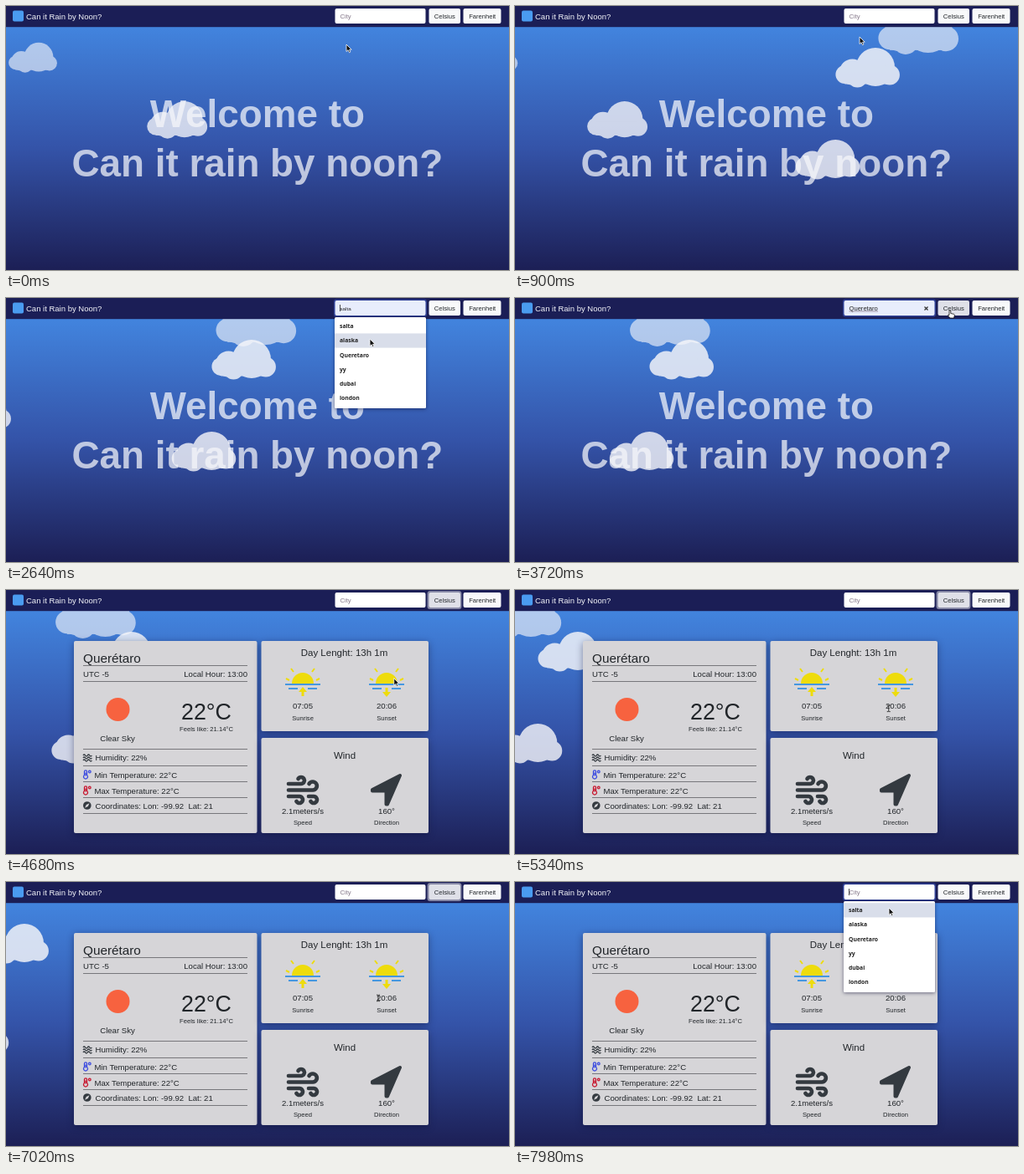
An HTML page that plays this animation: 600 px wide and 316 px high, repeating every 8 s.

```html
<!DOCTYPE html>
<html lang="en">
<head>
<meta charset="utf-8">
<title>Weather</title>
<style>
  html, body { margin: 0; width: 100%; height: 100%; overflow: hidden; background: #1c1f55; }
  svg { display: block; width: 600px; height: 316px; font-family: "Liberation Sans", Arial, sans-serif; }
  text { white-space: pre; }
  .mid { text-anchor: middle; }
  .s { font-size: 7.6px; }
  .m { font-size: 9.6px; }
  .l { font-size: 11.5px; }
  .card { fill: #d6d5d8; filter: drop-shadow(0 2px 4px rgba(10, 14, 50, .45)); }
  .menu { font: 700 6.8px "Noto Sans", "Open Sans", sans-serif; }
</style>
</head>
<body>
<svg viewBox="0 0 600 316">
  <defs>
    <linearGradient id="sky" x1="0" y1="0" x2="0" y2="1">
      <stop offset="0" stop-color="#4284de"/>
      <stop offset=".5" stop-color="#3453a8"/>
      <stop offset="1" stop-color="#1c1f55"/>
    </linearGradient>
    <g id="cloud" fill="#f7f7fa">
      <circle cx="11" cy="32" r="11"/>
      <circle cx="20" cy="29" r="15.5"/>
      <circle cx="47.5" cy="23" r="23"/>
      <circle cx="26" cy="35.5" r="12"/>
      <circle cx="64.500" cy="32.500" r="12"/>
      <rect x="11" y="26" width="53.500" height="17.500"/>
    </g>
    <g id="halfSun" fill="none" stroke-width="2">
      <path d="M-13 21A13 13 0 0 1 13 21Z" fill="#eedc0c"/>
      <path d="M-20 15L-16 17M-14 3L-11 7M14 3L11 7M20 15L16 17" stroke="#eedc0c"/>
      <path d="M-21 22H21M-17 27H-6M6 27H17" stroke="#4597e0"/>
    </g>
    <g id="thermo" fill="none" stroke-width="1.3">
      <path d="M1.5 6V1.8a1.5 1.5 0 0 1 3 0V6a2.5 2.5 0 1 1-3 0ZM3 3V7"/>
      <circle cx="7.8" cy="2" r="1.3"/>
    </g>
  </defs>

  <rect y="25" width="600" height="291" fill="url(#sky)"/>
  <g id="welcome" class="mid" font-size="45.8" font-weight="700" fill="#fff" fill-opacity=".69">
    <text x="299.8" y="145">Welcome to</text>
    <text x="299.8" y="204">Can it rain by noon?</text>
  </g>
  <g id="clouds"></g>

  <g id="cards" fill="#212529">
    <rect class="card" x="81" y="61" width="218.5" height="230" rx="2"/>
    <rect class="card" x="304.5" y="61" width="199.5" height="108" rx="2"/>
    <rect class="card" x="304.5" y="177" width="199.5" height="114" rx="2"/>
    <path d="M92 90.5H288M92 109.5H288M92 190.5H288M92 210.5H288M92 229.5H288M92 248.5H288M92 267.5H288" stroke="#77777b"/>
    <text x="92" y="87" font-size="15.3">Querétaro</text>
    <g class="m">
      <text x="92" y="104">UTC -5</text>
      <text x="288" y="104" text-anchor="end">Local Hour: 13:00</text>
      <text class="mid" x="133" y="180.5">Clear Sky</text>
      <text x="106.5" y="204">Humidity: 22%</text>
      <text x="105.5" y="224.5">Min Temperature: 22°C</text>
      <text x="105.5" y="243.5">Max Temperature: 22°C</text>
      <text x="106.5" y="262">Coordinates: Lon: -99.92  Lat: 21</text>
    </g>
    <circle cx="133.5" cy="143" r="14" fill="#f7623f"/>
    <text class="mid" x="239" y="155" font-size="26.8">22°C</text>
    <text class="mid s" x="239" y="169">Feels like: 21.14°C</text>
    <path d="M92 198q1.3-2 2.6 0t2.6 0t2.6 0t2.6 0M92 201q1.3-2 2.6 0t2.6 0t2.6 0t2.6 0M92 204q1.3-2 2.6 0t2.6 0t2.6 0t2.6 0" fill="none" stroke="#343a40" stroke-width="1.3"/>
    <use href="#thermo" x="92" y="215.5" stroke="#3c4be0"/>
    <use href="#thermo" x="92" y="234.5" stroke="#c8172f"/>
    <circle cx="96.8" cy="258" r="4.8" fill="#343a40"/>
    <path d="M99.5 255.3L97.8 259L94.1 260.7L95.8 257Z" fill="#d6d5d8"/>

    <g class="mid">
      <text class="l" x="403.5" y="79">Day Lenght: 13h 1m</text>
      <text class="l" x="404" y="202">Wind</text>
      <g class="m">
        <text x="354" y="142">07:05</text>
        <text x="454" y="142">20:06</text>
        <text x="354" y="268">2.1meters/s</text>
        <text x="454" y="268">160°</text>
      </g>
      <g class="s">
        <text x="354" y="156">Sunrise</text>
        <text x="454" y="156">Sunset</text>
        <text x="354" y="281">Speed</text>
        <text x="454" y="281">Direction</text>
      </g>
    </g>
    <use href="#halfSun" x="354" y="91"/>
    <use href="#halfSun" x="454" y="91"/>
    <path d="M354 116l5 6h-3.5v5h-3v-5h-3.5ZM454 128l5-6h-3.5v-5h-3v5h-3.5Z" fill="#eedc0c"/>
    <g fill="none" stroke="#343a40" stroke-width="4.6" stroke-linecap="round">
      <path d="M337 232H352a4 4 0 1 0-3.5-6"/>
      <path d="M337 239.5H366a5 5 0 1 0-4.5-7.5"/>
      <path d="M337 247H350a4 4 0 1 1-3.5 6"/>
      <path d="M361 247H367a4 4 0 1 1-3.5 6"/>
    </g>
    <path d="M470 222L455 256.5H453.5V240.5H437V239Z" fill="#343a40" stroke="#343a40" stroke-width="4" stroke-linejoin="round"/>
  </g>

  <rect width="600" height="25.2" fill="#1b1e56"/>
  <rect x="8" y="5.5" width="13" height="13" rx="2" fill="#4a9bf0"/>
  <text x="24" y="15.5" font-size="9.5" fill="#f4f5fa">Can it Rain by Noon?</text>

  <rect id="fieldRing" x="391" y="1.5" width="111" height="21" rx="3" fill="#2f3f94"/>
  <rect id="field" x="392.5" y="3" width="108" height="18" rx="2"/>
  <text id="entry" x="398.5" y="14.5"></text>
  <rect id="caret" x="398" y="8" width=".8" height="8" fill="#222"/>
  <path id="clear" d="M488.5 10.5l4 4m0-4l-4 4" stroke="#333" stroke-width="1.2"/>
  <path id="spell" d="M398.5 16H433" stroke="#8d7f90" stroke-width=".8"/>

  <rect id="buttonRing" x="502.5" y="1" width="41" height="22" rx="3.5" fill="#8587a5"/>
  <rect id="celsius" x="504.5" y="3" width="37.5" height="18" rx="2"/>
  <rect x="545.5" y="3" width="45" height="18" rx="2" fill="#f8f9fa"/>
  <g class="s mid" fill="#212529">
    <text x="523.3" y="14.5">Celsius</text>
    <text x="568.2" y="14.5">Farenheit</text>
  </g>

  <g id="menu" class="menu" fill="#222">
    <rect x="392" y="23" width="109" height="109" rx="1.5" fill="#fff" style="filter:drop-shadow(0 1px 2px rgba(0,0,40,.5))"/>
    <rect id="hover" x="392" width="109" height="17.2" fill="#d9deea"/>
  </g>

  <g id="pointer">
    <path data-kind="arrow" d="M0 0V8.5L2 6.7L3.5 9.7L4.9 9L3.5 6.2H6.2Z" fill="#111" stroke="#fff" stroke-width=".8"/>
    <path data-kind="hand" d="M-1 5V.8a.9.9 0 0 1 1.8 0V3.5L4.5 4.3Q5.500 4.600 5.300 6L4.500 9H0L-2.600 6Q-2.500 4.500-1 5.500Z" fill="#fff" stroke="#111" stroke-width=".8"/>
    <path data-kind="beam" d="M-2-3.5H-.5L0-3L.5-3.5H2M0-3V3.5M-2 4H-.5L0 3.5L.5 4H2" fill="none" stroke="#222" stroke-width=".9"/>
  </g>
</svg>
<script>
const LOOP = 8000;
const $ = id => document.getElementById(id);
const show = (el, on) => el.setAttribute('visibility', on ? 'visible' : 'hidden');
const svgEl = (name, attrs, parent) => {
  const el = document.createElementNS('http://www.w3.org/2000/svg', name);
  for (const key in attrs) el.setAttribute(key, attrs[key]);
  return parent.appendChild(el);
};

// Distance covered by a cloud of unit speed; the page stalls while loading.
const drift = [[0, -74], [900, 0], [2640, 137], [3720, 222], [4200, 226],
  [5340, 355], [7020, 408], [7560, 462], [8000, 497]];
const pointerPath = [[0, 406, 46], [900, 411, 37], [1350, 428, 13], [1900, 430, 15],
  [2150, 432, 33], [2480, 434, 38], [2640, 434, 49], [2880, 434, 67], [3060, 434, 67],
  [3600, 519, 15], [3900, 519, 15], [4500, 470, 90], [5100, 446, 142], [7020, 444, 139],
  [7420, 446, 13], [7680, 446, 13], [7860, 446, 31], [8000, 446, 31]];

// Piecewise linear lookup, one result per column after the time.
function at(steps, t) {
  const i = Math.max(1, steps.findIndex(s => s[0] >= t));
  const a = steps[i - 1], b = steps[i];
  const k = (t - a[0]) / (b[0] - a[0]);
  return a.slice(1).map((v, j) => v + (b[j + 1] - v) * k);
}

const clouds = [
  { x: -54.5, y: 43.8, size: .755, speed: .78, opacity: .62 },
  { x: 86.2, y: 114, size: .94, speed: 1.11, opacity: .78 },
  { x: 433.5, y: -1.5, size: 1.25, speed: 1.335, opacity: .62, from: 300 },
  { x: 382.5, y: 50, size: 1, speed: 1, opacity: .82, from: 300 },
  { x: 334.8, y: 160, size: 1, speed: 1, opacity: .8, from: 300 }
];
for (const c of clouds) c.el = svgEl('use', { href: '#cloud', opacity: c.opacity }, $('clouds'));

const cities = ['salta', 'alaska', 'Queretaro', 'yy', 'dubai', 'london'];
const ROW = 17.2, MENU_TOP = 25.2;
cities.forEach((city, i) => {
  svgEl('text', { x: 398, y: MENU_TOP + ROW * i + 11 }, $('menu')).textContent = city;
});

const pointerKinds = [...$('pointer').children];

function render(t) {
  const [moved] = at(drift, t);
  for (const c of clouds) {
    c.el.setAttribute('transform', `translate(${c.x - c.speed * moved} ${c.y}) scale(${c.size})`);
    show(c.el, t >= (c.from || 0));
  }

  const loaded = t >= 4500, picked = t >= 3060 && t < 4260;
  show($('welcome'), !loaded);
  show($('cards'), loaded);

  const [px, py] = at(pointerPath, t);
  const menuOpen = (t >= 1500 && t < 3060) || t >= 7640;
  const row = Math.floor((py - MENU_TOP) / ROW);
  const hovering = menuOpen && row >= 0 && row < cities.length;
  show($('menu'), menuOpen);
  show($('hover'), hovering);
  $('hover').setAttribute('y', MENU_TOP + ROW * row);

  // The field previews the hovered city a moment late.
  const lateRow = Math.floor((at(pointerPath, Math.max(0, t - 120))[1] - MENU_TOP) / ROW);
  const preview = menuOpen && t < 3060 && lateRow >= 0 ? cities[lateRow] : '';
  const focused = menuOpen || (t >= 1500 && t < 3800);
  const entry = $('entry');
  entry.textContent = picked ? 'Queretaro' : preview || 'City';
  entry.setAttribute('font-size', preview ? 6.2 : 7.6);
  entry.setAttribute('fill', picked || preview ? '#222' : '#85788a');
  $('field').setAttribute('fill', preview || picked ? '#e8edfc' : '#fff');
  show($('fieldRing'), focused);
  show($('caret'), menuOpen);
  show($('clear'), picked);
  show($('spell'), picked);

  const overButton = px > 504 && px < 542 && py < 22;
  const pressed = t >= 3800 && t < 7640;
  show($('buttonRing'), pressed);
  $('celsius').setAttribute('fill', overButton || pressed ? '#dfe0e8' : '#f8f9fa');

  const overField = px > 392 && px < 501 && py < 22;
  const overTime = loaded && px > 441 && px < 467 && py > 132 && py < 146;
  const kind = overButton ? 'hand' : overField || overTime ? 'beam' : 'arrow';
  for (const el of pointerKinds) show(el, el.dataset.kind === kind);
  $('pointer').setAttribute('transform', `translate(${px} ${py})`);
}

const start = performance.now();
function tick() {
  render((performance.now() - start) % LOOP);
  requestAnimationFrame(tick);
}
tick();
</script>
</body>
</html>
```
